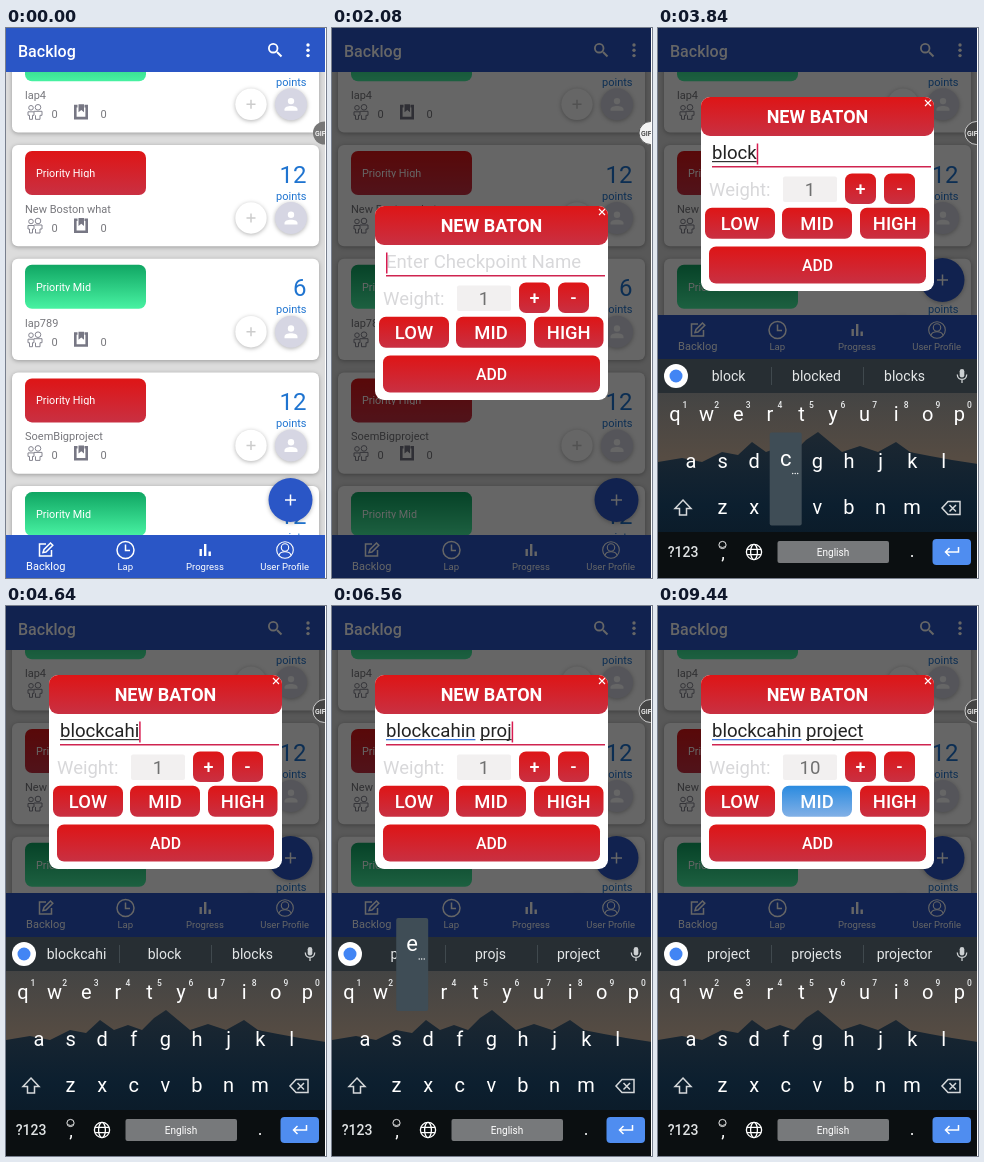
Recreate the animation shown at these times as an HTML page. Size 320 px wide and 550 px high, loop 9600 ms.

```html
<!DOCTYPE html>
<html lang="en">
<head>
<meta charset="utf-8">
<title>Backlog</title>
<style>
html, body { margin: 0; width: 100%; height: 100%; overflow: hidden; background: #dcdcdc; }
#stage { display: block; width: 320px; height: 550px; font-family: Roboto, sans-serif; }
.line { fill: none; stroke: #fff; stroke-width: 1.5; }
.mid { text-anchor: middle; }
.end { text-anchor: end; }
.bold { font-weight: 500; }
.lift { filter: drop-shadow(0 1.5px 2px rgba(0, 0, 0, .3)); }
</style>
</head>
<body>
<svg id="stage" viewBox="0 0 320 550">
  <defs>
    <linearGradient id="red" x2="0" y2="1"><stop stop-color="#de1516"/><stop offset="1" stop-color="#c93042"/></linearGradient>
    <linearGradient id="green" x2="0" y2="1"><stop stop-color="#10a663"/><stop offset="1" stop-color="#48f2a2"/></linearGradient>
    <linearGradient id="blue" x2="0" y2="1"><stop stop-color="#2a8be0"/><stop offset="1" stop-color="#82b0e6"/></linearGradient>
    <linearGradient id="sky" x2="0" y2="1"><stop stop-color="#3a4044"/><stop offset=".45" stop-color="#564c43"/></linearGradient>
    <linearGradient id="ground" x2="0" y2="1"><stop stop-color="#1d2832"/><stop offset=".5" stop-color="#0c1f2f"/><stop offset="1" stop-color="#0a1722"/></linearGradient>
  </defs>
  <g id="page"></g>
  <rect id="dim" width="320" height="550" opacity="0"/>
  <g id="dialog"></g>
  <g id="keyboard"></g>
  <g id="badge">
    <circle cx="318.5" cy="105" r="11.5"/>
    <text x="309" y="108" font-size="7" font-weight="500">GIF</text>
  </g>
  <rect x="319" width="1" height="550" fill="#fff"/>
</svg>
<script>
const $ = id => document.getElementById(id);
const text = (x, y, size, str, fill = '#fff', cls = '', more = '') =>
  `<text x="${x}" y="${y}" font-size="${size}" fill="${fill}" class="${cls}" ${more}>${str}</text>`;
const rect = (x, y, w, h, r, fill, more = '') =>
  `<rect x="${x}" y="${y}" width="${w}" height="${h}" rx="${r}" fill="${fill}" ${more}/>`;
const disc = (x, y, r, fill, more = '') =>
  `<circle cx="${x}" cy="${y}" r="${r}" fill="${fill}" ${more}/>`;
const line = (d, more = '') => `<path class="line" d="${d}" ${more}/>`;
const at = (x, y, body) => `<g transform="translate(${x} ${y})">${body}</g>`;

// Page
const people = `<g fill="none" stroke="#858590">
  <circle cx="4" cy="3.5" r="2.3"/><circle cx="11" cy="3" r="2.8"/>
  <path d="M1 7.5H7V11H5.5V15H2.5V11H1ZM7 7H15V11H13V15H8.5V11"/></g>`;
const book = `<path fill="none" stroke="#777784" stroke-width="2.6" d="M4 1.8H1.8V13.8H13.2V1.8H11"/>
  <path fill="#777784" d="M5 0H10.5V8L7.8 5.8L5 8Z"/>`;

function card(i, title, level, points) {
  const color = level === 'High' ? 'red' : 'green';
  return at(0, 3.3 + 113.7 * i,
    rect(6, 0, 307, 101.3, 6, '#fff', 'class="lift"') +
    rect(19, 6, 121, 44, 7, `url(#${color})`) +
    `<svg width="140" height="32.5">${text(30, 32, 10.8, 'Priority ' + level)}</svg>` +
    text(19, 68, 11, title, '#77777c') +
    at(21, 73, people) + text(45.5, 87, 11, 0, '#77777c') +
    at(67.5, 73, book) + text(94.5, 87, 11, 0, '#77777c') +
    text(300.5, 37.5, 24, points, '#1f74d0', 'end') +
    text(300.5, 54.5, 11, 'points', '#1f74d0', 'end') +
    disc(245, 73, 15.7, '#fff', 'class="lift"') +
    line('M240.5 73H249.5M245 68.5V77.5', 'style="stroke:#ccc"') +
    disc(285, 73, 16, '#d6d6e3', 'class="lift"') +
    disc(285, 69.8, 3.2, '#fff') + '<path fill="#fff" d="M278.5 79.5V78C278.5 73.5 291.5 73.5 291.5 78V79.5Z"/>');
}

const cards = [['lap4', 'Mid', 6], ['New Boston what', 'High', 12], ['lap789', 'Mid', 6],
  ['SoemBigproject', 'High', 12], ['lap12', 'Mid', 12]];

$('page').innerHTML = rect(0, 0, 320, 550, 0, '#dcdcdc') +
  cards.map((c, i) => card(i, ...c)).join('') +
  rect(0, 0, 320, 44, 0, '#2a56c6') + text(12, 28.5, 16, 'Backlog', '#fff', 'bold') +
  line('M271 24L275.5 28.5', 'style="stroke-width:2"') +
  '<circle class="line" cx="267.2" cy="20.2" r="4.3" style="stroke-width:1.8"/>' +
  [17, 22.3, 27.6].map(y => disc(302, y, 1.7, '#fff')).join('') +
  `<g id="bottom">
    ${disc(284.5, 472, 22, '#2a56c6', 'class="lift"')}
    <circle id="ripple" cx="284.5" cy="472" r="22" fill="#fff" opacity="0"/>
    ${line('M279 472H290M284.5 466.5V477.5')}
    ${rect(0, 507, 320, 44, 0, '#2a56c6')}
    ${line('M40 516H33.5V528H45.5V522M37 524.5L38 521.5L44.5 515L46.8 517.2L40 524Z')}
    <circle class="line" cx="119.5" cy="522" r="8.5"/>${line('M119.5 516.5V522.5H124')}
    ${rect(193.5, 521, 2.4, 7, 0, '#fff')}${rect(198, 516, 2.4, 12, 0, '#fff')}${rect(202.5, 523.5, 2.4, 4.5, 0, '#fff')}
    <g class="line" style="stroke-width:1.1"><circle cx="279" cy="522" r="8.3"/><circle cx="279" cy="519.5" r="3.7"/>
      <path d="M273 527.5C274 522.5 284 522.5 285 527.5"/></g>
    ${text(39.7, 542, 11, 'Backlog', '#fff', 'mid')}
    ${text(119.3, 542, 9.6, 'Lap', '#fff', 'mid')}
    ${text(199, 542, 9.5, 'Progress', '#fff', 'mid')}
    ${text(278.7, 542, 9.5, 'User Profile', '#fff', 'mid')}
  </g>`;

// Dialog, drawn from its own top edge
const button = (x, y, w, h, label, size, id = '') =>
  rect(x, y, w, h, 7, 'url(#red)', id && `id="${id}"`) +
  text(x + w / 2, y + h / 2 + size * .36, size, label, '#fff', 'mid bold');

$('dialog').innerHTML = rect(43, 0, 233, 194, 9, '#fff') +
  rect(43, 0, 233, 39, 9, 'url(#red)') +
  text(159.5, 26, 18, 'NEW BATON', '#fff', 'mid', 'font-weight="700"') +
  line('M267 3L273 9M273 3L267 9', 'style="stroke-width:1.1"') +
  `<text id="hint" x="54" y="62" font-size="18.6" fill="#d8d8da">Enter Checkpoint Name</text>
  <text id="entry" x="54" y="62" font-size="18.6" fill="#222"></text>
  <rect id="done" x="54" y="64" height="1.3" fill="#3f78d8"/>
  <rect id="word" y="64" height="1.2" fill="#333"/>
  <rect id="caret" y="46.5" width="1.5" height="21" fill="#d81b50"/>` +
  rect(54, 69, 219, 1.5, 0, '#cf2450') +
  text(51, 99, 18.5, 'Weight:', '#d8d8da') +
  rect(125, 79.5, 54, 25.5, 2, '#f2f0f0') +
  '<text id="weight" x="152" y="99" font-size="18.6" fill="#707070" class="mid"></text>' +
  button(187, 76.5, 31, 30.5, '+', 18) + button(226, 76.5, 31, 30.5, '-', 18) +
  button(47, 110.7, 70, 31, 'LOW', 18.4) + button(124, 110.7, 70, 31, 'MID', 18.4, 'mid') +
  button(202, 110.7, 69.5, 31, 'HIGH', 18.4) + button(51, 149.5, 217, 37, 'ADD', 15.8);

// Keyboard
const rows = [['qwertyuiop', 17, 393], ['asdfghjkl', 33, 439.5], ['zxcvbnm', 64.5, 485.5]];
const keys = {};
for (const [letters, x, y] of rows)
  [...letters].forEach((c, i) => keys[c] = [x + 31.6 * i, y]);

const mic = `<rect x="301.7" y="341" width="4.6" height="8.5" rx="2.3" fill="#ccd0d2"/>
  ${line('M299.3 346.5C299.3 353 308.7 353 308.7 346.5M304 351.5V355', 'style="stroke:#ccd0d2;stroke-width:1.3"')}`;
const gear = `<circle cx="201" cy="348.5" r="3.9" fill="none" stroke="#aeb4b7" stroke-width="3"/>
  <circle cx="201" cy="348.5" r="6" fill="none" stroke="#aeb4b7" stroke-width="2" stroke-dasharray="2.7 3.58"/>`;

$('keyboard').innerHTML = rect(0, 331, 320, 219, 0, 'url(#sky)') +
  `<path fill="url(#ground)" d="M0 434L24 430L44 434L64 424L80 427L94 414L108 424L122 419L136 424L148 412L160 404
    L172 414L184 424L202 418L220 424L238 414L252 424L272 428L294 432L320 436V550H0Z"/>` +
  rect(0, 504, 320, 46, 0, '#0b0f11') +
  rect(0, 331, 320, 34, 0, '#272e33') +
  disc(18, 348, 12, '#fff') + disc(18, 348, 6.5, '#4285f4') + mic +
  `<g id="tools">
    <g class="line" style="stroke:#aeb4b7;stroke-width:1.4">
      <path d="M55 342H67V350L63 354.5H55ZM67 350H63V354.5M58.5 348.5C59.5 351 62.5 351 63.5 348.5"/>
      <path d="M149 343H159V354.5H149ZM151 347H157M151 349.5H157M151 352H155M152 342H156"/></g>
    ${disc(59, 346, .9, '#aeb4b7')}${disc(63, 346, .9, '#aeb4b7')}
    ${text(107, 352, 10.5, 'GIF', '#b8bdc0', 'mid', 'font-weight="700"')}
    ${gear}${rect(229, 339, .8, 18, 0, '#485056')}
    ${[253, 258, 263].map(x => disc(x, 348.5, 1.4, '#aeb4b7')).join('')}
  </g>
  <g id="words">${rect(113, 339, .8, 18, 0, '#485056')}${rect(205, 339, .8, 18, 0, '#485056')}
    ${[70.5, 158.5, 246.5].map(x => text(x, 353, 14, '', '#e4e7e8', 'mid')).join('')}</g>` +
  Object.entries(keys).map(([c, [x, y]], i) => text(x, y, 20, c, '#fff', 'mid') +
    (i < 10 ? text(x + 10, 379.5, 8.5, (i + 1) % 10, '#e8eaeb', 'mid bold') : '')).join('') +
  line('M25 472L33 480.5H28.5V487H21.5V480.5H17Z', 'style="stroke:#d5d8da"') +
  line('M290 473.5H302V486.5H290L284 480ZM291.5 477L298 483.5M298 477L291.5 483.5', 'style="stroke:#d5d8da"') +
  text(25, 529, 14, '?123', '#e0e3e4', 'mid bold') +
  '<circle class="line" cx="64.5" cy="517" r="3.6" style="stroke-width:.9"/>' +
  line('M62.5 518C63 520 66 520 66.5 518', 'style="stroke-width:.8"') + text(65, 531, 18, ',', '#fff', 'mid') +
  `<g class="line" style="stroke-width:1.3"><circle cx="96" cy="524" r="7.6"/>
    <ellipse cx="96" cy="524" rx="3.4" ry="7.6"/><path d="M89 521.3H103M89 526.7H103"/></g>` +
  rect(119.5, 513, 111.5, 22, 2, '#77797b', 'id="space"') + text(175, 528, 10, 'English', '#fff', 'mid') +
  text(254, 529, 18, '.', '#fff', 'mid') +
  rect(274.5, 511, 38.5, 26, 4, '#4f8df0') +
  line('M300.5 519V524H287.5M291.5 520L287.5 524L291.5 528') +
  `<g id="popup">${rect(-16, -81, 32, 93, 2, '#3f4d56')}
    <text id="glyph" y="-48" font-size="22" fill="#fff" class="mid"></text>
    ${[7, 9.5, 12].map(x => disc(x, -40, .7, '#fff')).join('')}</g>`;

// Timeline in ticks of 160 ms
const TICK = 160, LOOP = 9600;
const typed = 'blockcahin project';
// [tick, typed letters, pressed key]
const strokes = [[16, 0, 'b'], [17, 1], [18, 1, 'l'], [19, 2], [20, 2, 'o'], [21, 3, 'c'], [22, 4], [23, 4, 'k'],
  [24, 5, 'c'], [25, 6], [26, 6, 'a'], [27, 7, 'h'], [28, 8, 'i'], [29, 9], [30, 9, 'n'], [31, 10], [33, 11],
  [34, 11, 'p'], [35, 12, 'r'], [36, 13], [38, 13, 'o'], [39, 14], [40, 14, 'j'], [41, 15, 'e'], [42, 16, 'c'],
  [43, 18]];
const guesses = {
  b: ['b', 'be', 'but'], bl: ['bl', 'blue', 'black'], blo: ['blo', 'blood', 'blow'],
  block: ['block', 'blocked', 'blocks'], pr: ['pr', 'PR', 'probably'],
  project: ['project', 'projects', 'projector'], '': ['is', 'and', 'the']
};
const weightTicks = [47, 48, 49, 50, 51, 52, 53, 55, 56];

const set = (id, attrs) => {
  for (const k in attrs) $(id).setAttribute(k, attrs[k]);
};
const show = (id, on) => set(id, { visibility: on ? 'visible' : 'hidden' });

function draw(n) {
  // Opening of the dialog and the keyboard
  const open = n < 8 ? 0 : n < 9 ? .5 : 1;
  const up = n < 14 ? 0 : n < 15 ? .5 : 1;
  set('ripple', { opacity: n === 7 ? .25 : 0 });
  set('dim', { opacity: open * .6 });
  set('dialog', { opacity: open, transform: `translate(0 ${178 - 109 * up})` });
  set('bottom', { transform: `translate(0 ${-220 * up})` });
  set('keyboard', { transform: `translate(0 ${219 * (1 - up)})` });
  show('keyboard', up);
  const [fill, ring, ink] = up ? ['#444', '#ccc', '#fff'] : open ? ['#f2f2f2', '#555', '#333'] : ['#777', 'none', '#fff'];
  const [dot, label] = $('badge').children;
  dot.setAttribute('fill', fill);
  dot.setAttribute('stroke', ring);
  label.setAttribute('fill', ink);

  // Typing
  let count = 0, key = '';
  for (const [tick, c, k] of strokes) if (n >= tick) [count, key] = [c, k];
  const str = typed.slice(0, count);
  const entry = $('entry');
  entry.textContent = str.replace(' ', '\u00a0');
  const width = i => i ? entry.getSubStringLength(0, i) : 0;
  const split = count > 10 ? 11 : 0;
  const end = 54 + width(count), from = 54 + width(split);
  show('hint', !count);
  set('done', { width: split ? width(10) : 0 });
  set('word', { x: from, width: end - from });
  set('caret', { x: end, opacity: n >= 13 && n < 46 ? 1 : 0 });

  const word = str.slice(split);
  const list = guesses[word] || [word, word === 'blockcahin' ? 'blockchain' : word.length > 4 ? 'block' : word + 's',
    split ? 'project' : 'blocks'];
  show('tools', up && !count);
  show('words', up && count);
  document.querySelectorAll('#words text').forEach((el, i) => el.textContent = list[i]);
  set('space', { fill: n === 33 ? '#97999b' : '#77797b' });
  show('popup', key);
  if (key) {
    set('popup', { transform: `translate(${keys[key]})` });
    $('glyph').textContent = key;
  }

  // Weight and level
  $('weight').textContent = 1 + weightTicks.filter(t => n >= t).length;
  set('mid', { fill: n >= 59 ? 'url(#blue)' : 'url(#red)', opacity: n === 58 ? .75 : 1 });
}

let last = -1;
const start = performance.now();
function loop() {
  const n = Math.floor((performance.now() - start) % LOOP / TICK);
  if (n !== last) draw(last = n);
  requestAnimationFrame(loop);
}
loop();
</script>
</body>
</html>
```
